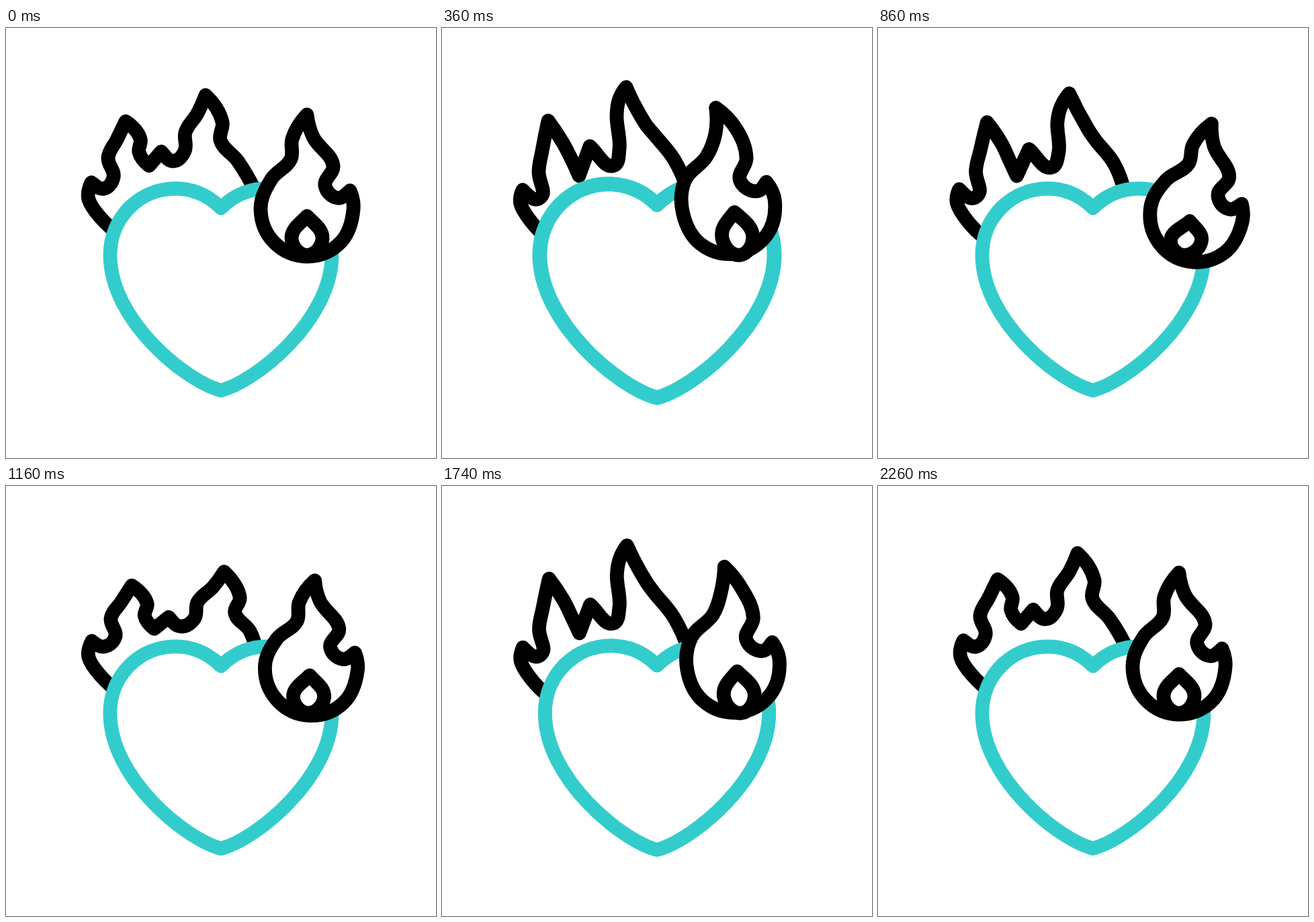
Animation of 640 by 640 pixels, one loop 2.4 s. Source, as an HTML page:

```html
<!DOCTYPE html>
<html lang="en">
<head>
<meta charset="utf-8">
<title>Burning heart</title>
<style>
  html, body { margin: 0; width: 100%; height: 100%; overflow: hidden; background: #fff; }
  svg { display: block; width: 100%; height: 100%; }
  path { fill: #fff; stroke: #000; stroke-width: 20.8; stroke-linecap: round; stroke-linejoin: round; }
  #heart { stroke: #33cccc; }
</style>
</head>
<body>
<svg viewBox="0 0 640 640">
  <path id="back"/>
  <path id="heart" d="M320 268C300 248 278 239 252 239C198 239 155 283 155 338C155 435 268 526 320 539.5C372 526 485 435 485 338C485 283 442 239 388 239C362 239 340 248 320 268Z"/>
  <path id="front"/>
  <path id="core"/>
</svg>
<script>
const LOOP = 2400, MOVE = 2260, STEP = 20, BEAT = 445;

const pairs = text => text.split(' ').map(p => p.split(',').map(Number));

// Middle of the stroke; the back flame morphs between a curly and a straight outline
const curly = pairs('170,308 123,255 127,230 146,239 160,222 152,193 165,166 178,139 200,165 198,185 213,205 ' +
  '231,184 249,198 266,183 267,155 285,127 297,100 322,140 319,167 345,198 372,245');
const straight = pairs('158,313 117,262 120,241 140,255 150,247 144,215 149,183 158,138 180,171 194,198 204,220 ' +
  '220,176 255,205 264,180 260,132 263,108 274,88 303,143 317,160 345,195 366,243');
const front = pairs('448,340 399,319 379,270 395,225 424,195 426,165 448,129 457,162 487,205 475,235 494,253 ' +
  '512,242 517,270 498,319');
const core = pairs('448,280 425,314 448,338 471,314');

// Motion keys: time, back straightness, back slump, front turn, front curl
const keys = [
  [0, 0, 0, 0, 0],
  [360, 1, 0, -0.13, 1],
  [860, 0.9, 9, 0.165, 0],
  [1160, 0, 28, 0.04, 0],
  [1540, 0.95, 4, -0.135, 1],
  [1940, 0.9, -2, -0.03, 0.5],
  [MOVE, 0, 0, 0, 0]
];

const mix = (a, b, u) => a + (b - a) * u;
const mean = (a, b) => a * b > 0 ? 2 * a * b / (a + b) : 0;

// Monotone cubic interpolation of one key column
function value(col, t) {
  const last = keys.length - 1;
  let i = 0;
  while (keys[i + 1][0] <= t) i++;
  const slope = k => {
    const [a, b] = [keys[(k + last) % last], keys[(k + last) % last + 1]];
    return (b[col] - a[col]) / (b[0] - a[0]);
  };
  const span = keys[i + 1][0] - keys[i][0], u = (t - keys[i][0]) / span, v = 1 - u;
  return mix(keys[i][col], keys[i + 1][col], u * u * (3 - 2 * u))
    + span * u * v * (mean(slope(i - 1), slope(i)) * v - mean(slope(i), slope(i + 1)) * u);
}

const bump = (t, mid, half) =>
  Math.abs(t - mid) < half ? Math.cos((t - mid) / half * Math.PI / 2) ** 2 : 0;

function backShape(t) {
  const form = value(1, t), slump = value(2, t);
  const lift = 10 * bump(t, 560, 200) + 8 * bump(t, 1640, 100);
  return curly.map(([cx, cy], i) => {
    const x = mix(cx, straight[i][0], form), y = mix(cy, straight[i][1], form);
    const h = Math.max(0, (235 - y) / 135), w = slump * Math.sqrt(h) * (x - 100) / 200;
    return [x + w, y + w - lift * h];
  });
}

// Turns about a point below the flame, with a ripple that grows towards the tip
function frontShape(t) {
  const slump = value(2, t), turn = value(3, t), curl = value(4, t);
  const cos = Math.cos(turn), sin = Math.sin(turn);
  return front.map(([x, y]) => {
    const h = Math.max(0, (270 - y) / 141);
    const dx = x - 410 + curl * 22 * h * Math.sin((y - 129) / 68 * Math.PI);
    const dy = y - 430 + h * (0.35 * slump - 8 * curl);
    return [410 + dx * cos - dy * sin, 430 + dx * sin + dy * cos];
  });
}

function coreShape(t) {
  const s = value(3, t) * 6.5;
  return core.map(([x, y]) => {
    const h = (338 - y) / 58;
    return [x + s * (6 + 9 * h), y + s * 7 * h];
  });
}

// Smooth path through the points; corners continue the arc of their neighbour
function trace(pts, sharp, closed) {
  const n = pts.length, at = i => pts[(i + n) % n];
  const gap = i => Math.hypot(at(i + 1)[0] - at(i)[0], at(i + 1)[1] - at(i)[1]);
  const angle = i => Math.atan2(at(i + 1)[1] - at(i)[1], at(i + 1)[0] - at(i)[0]);
  const wrap = a => Math.atan2(Math.sin(a), Math.cos(a));
  const isCorner = i => sharp.includes(i % n) || !closed && (i === 0 || i === n - 1);
  const tangent = i => angle(i - 1) + wrap(angle(i) - angle(i - 1)) / 2;
  const arc = (chord, other) => {
    const bend = wrap(other - chord);
    return chord - bend * Math.max(0, Math.cos(2 * bend));
  };
  const put = (p, a = 0, r = 0) =>
    (p[0] + r * Math.cos(a)).toFixed(2) + ' ' + (p[1] + r * Math.sin(a)).toFixed(2) + ' ';
  let d = 'M' + put(pts[0]);
  for (let i = 0; i < (closed ? n : n - 1); i++) {
    const chord = angle(i), len = gap(i), a = isCorner(i), b = isCorner(i + 1);
    const start = a ? b ? chord : arc(chord, tangent(i + 1)) : tangent(i);
    const end = b ? a ? chord : arc(chord, tangent(i)) : tangent(i + 1);
    const r0 = 0.36 * (a ? len : Math.min(len, 1.5 * gap(i - 1)));
    const r1 = 0.36 * (b ? len : Math.min(len, 1.5 * gap(i + 1)));
    d += 'C' + put(at(i), start, r0) + put(at(i + 1), end, -r1) + put(at(i + 1));
  }
  return d + (closed ? 'Z' : '');
}

// One heartbeat: slow squeeze, quick swell, release
function pulse(t) {
  const p = t % BEAT;
  if (t >= BEAT * 5 || p > 415) return 1;
  if (p < 215) return 1 - 0.028 * (p / 215) ** 3;
  if (p < 320) return 0.972 + 0.128 * ((p - 215) / 105) ** 2.3;
  return 1.1 - 0.1 * (p - 320) / 95;
}

const set = (id, name, text) => document.getElementById(id).setAttribute(name, text);

function draw(now) {
  const t = Math.min(Math.floor(now % LOOP / STEP) * STEP, MOVE) % MOVE;
  set('back', 'd', trace(backShape(t), [2, 7, 10, 11, 16], false));
  set('front', 'd', trace(frontShape(t), [6, 11], true));
  set('core', 'd', trace(coreShape(t), [0], true));
  set('heart', 'transform', `translate(320 355) scale(${pulse(t).toFixed(4)}) translate(-320 -355)`);
}

const begin = performance.now();
function tick() {
  draw(performance.now() - begin);
  requestAnimationFrame(tick);
}
tick();
</script>
</body>
</html>
```
